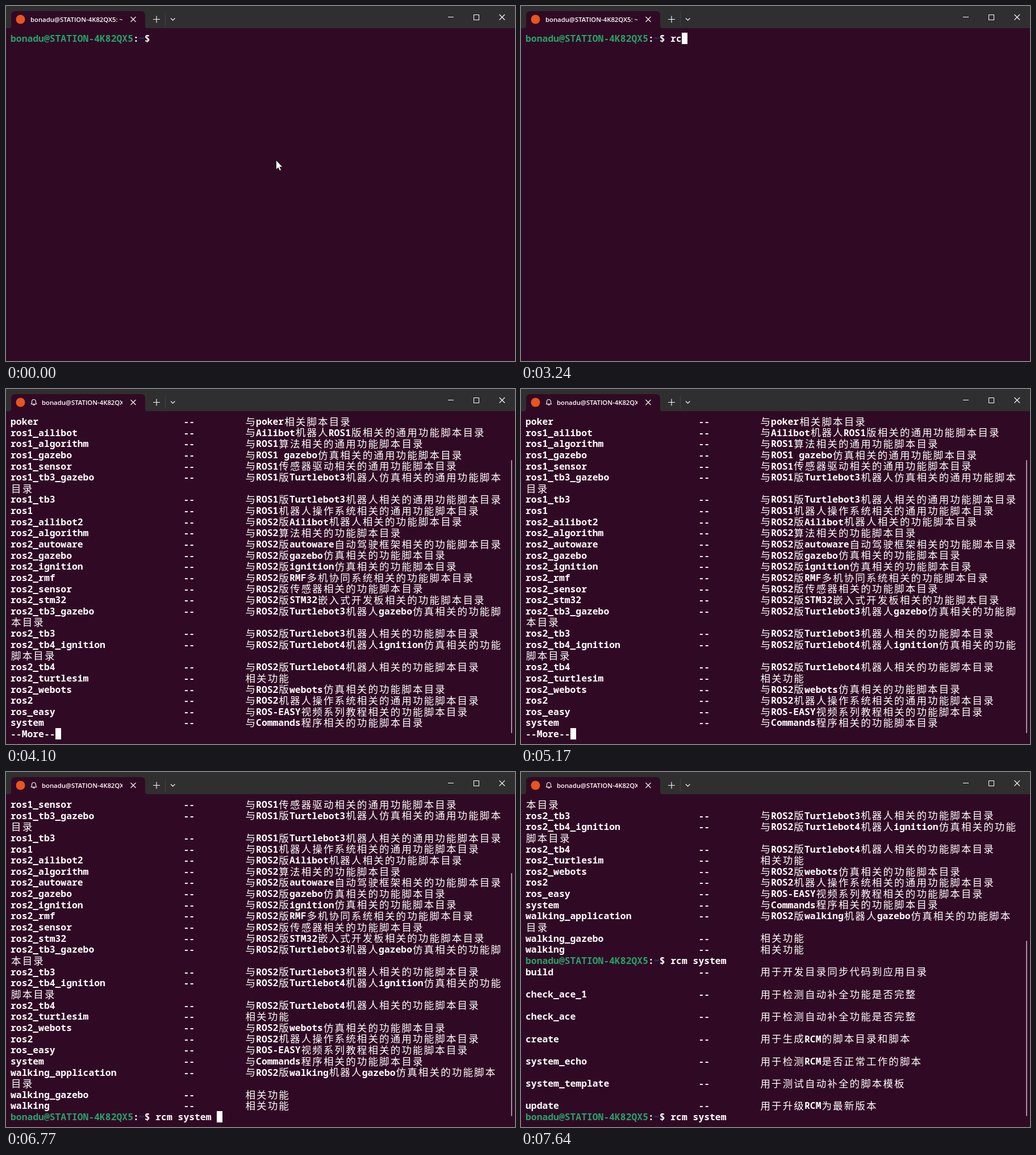
Write an HTML page that moves like this. It is 896x625 px and loops after 8 s.

```html
<!DOCTYPE html>
<html lang="zh-CN">
<head>
<meta charset="utf-8">
<title>Terminal</title>
<style>
  html, body { margin: 0; width: 100%; height: 100%; overflow: hidden; background: #300a24; }
  svg { display: block; width: 896px; height: 625px; }
  text { white-space: pre; fill: #fff; }
  .mono { font: 600 16.37px "Noto Sans Mono", monospace; font-variant-ligatures: none; }
  .cjk { font: 400 17.5px "Noto Sans CJK SC", "Noto Sans CJK", sans-serif; letter-spacing: 2.14px; }
  .title { font: 600 11.3px "Open Sans", "Noto Sans", sans-serif; }
  .icon { fill: none; stroke: #fff; stroke-width: 1.1; }
</style>
</head>
<body>
<svg viewBox="0 0 896 625">
  <defs><clipPath id="titleClip"><rect x="40" y="10" width="165" height="28"/></clipPath></defs>
  <rect width="896" height="625" fill="#300a24"/>
  <rect width="896" height="39" fill="#2f2f2f"/>
  <path d="M5 39Q9 39 9 35V17Q9 9 17 9H237Q245 9 245 17V35Q245 39 249 39Z" fill="#300a24"/>
  <circle cx="25.5" cy="23.5" r="8" fill="#e95420"/>
  <g clip-path="url(#titleClip)"><text id="title" class="title" y="28"></text></g>
  <path id="bell" class="icon" d="M44.5 26.5H53.5L52.5 24V22A3.5 3.5 0 0 0 45.5 22V24ZM47.5 27A1.5 1.5 0 0 0 50.5 27"/>
  <path class="icon" d="M219.5 19L228.5 28M228.5 19L219.5 28M290 21.5L293.7 25.2L297.4 21.5M868.5 15L878 24.5M878 15L868.5 24.5"/>
  <path class="icon" stroke-width="1.3" d="M259 23.5H271M265 17.5V29.5"/>
  <path class="icon" d="M778 19.5H788M823.5 15.5H832.5V24.5H823.5Z" shape-rendering="crispEdges"/>
  <path d="M280.5 12V35" stroke="#414141"/>
  <g id="screen"></g>
  <rect id="cursor" width="10" height="20" fill="#fff"/>
  <rect id="scrollbar" x="889" width="2" rx="1" fill="#a1949d"/>
  <path id="pointer" d="M0 0V16.5L3.8 13L6.2 18.6L8.9 17.4L6.5 11.9H11.3Z" fill="#fff" stroke="#111" stroke-width=".8"/>
</svg>
<script>
const LOOP = 8000, CELL = 9.82, ROW = 19.65, LEFT = 8, TOP = 47, COLUMNS = 88, LAST_ROW = 28;
const HOST = "bonadu@STATION-4K82QX5";
const PROMPT = HOST + ":~$ ";
const $ = id => document.getElementById(id);

const GENERAL = "相关的通用功能脚本目录", SCRIPTS = "相关的功能脚本目录";
const commands = [
  ["poker", "与poker相关脚本目录"],
  ["ros1_ailibot", "与Ailibot机器人ROS1版" + GENERAL],
  ["ros1_algorithm", "与ROS1算法" + GENERAL],
  ["ros1_gazebo", "与ROS1 gazebo仿真" + GENERAL],
  ["ros1_sensor", "与ROS1传感器驱动" + GENERAL],
  ["ros1_tb3_gazebo", "与ROS1版Turtlebot3机器人仿真" + GENERAL],
  ["ros1_tb3", "与ROS1版Turtlebot3机器人" + GENERAL],
  ["ros1", "与ROS1机器人操作系统" + GENERAL],
  ["ros2_ailibot2", "与ROS2版Ailibot机器人" + SCRIPTS],
  ["ros2_algorithm", "与ROS2算法" + SCRIPTS],
  ["ros2_autoware", "与ROS2版autoware自动驾驶框架" + SCRIPTS],
  ["ros2_gazebo", "与ROS2版gazebo仿真" + SCRIPTS],
  ["ros2_ignition", "与ROS2版ignition仿真" + SCRIPTS],
  ["ros2_rmf", "与ROS2版RMF多机协同系统" + SCRIPTS],
  ["ros2_sensor", "与ROS2版传感器" + SCRIPTS],
  ["ros2_stm32", "与ROS2版STM32嵌入式开发板" + SCRIPTS],
  ["ros2_tb3_gazebo", "与ROS2版Turtlebot3机器人gazebo仿真" + SCRIPTS],
  ["ros2_tb3", "与ROS2版Turtlebot3机器人" + SCRIPTS],
  ["ros2_tb4_ignition", "与ROS2版Turtlebot4机器人ignition仿真" + SCRIPTS],
  ["ros2_tb4", "与ROS2版Turtlebot4机器人" + SCRIPTS],
  ["ros2_turtlesim", "相关功能"],
  ["ros2_webots", "与ROS2版webots仿真" + SCRIPTS],
  ["ros2", "与ROS2机器人操作系统" + GENERAL],
  ["ros_easy", "与ROS-EASY视频系列教程" + SCRIPTS],
  ["system", "与Commands程序" + SCRIPTS],
  ["walking_application", "与ROS2版walking机器人gazebo仿真" + SCRIPTS],
  ["walking_gazebo", "相关功能"],
  ["walking", "相关功能"]
];
const systemCommands = [
  ["build", "用于开发目录同步代码到应用目录"],
  ["check_ace_1", "用于检测自动补全功能是否完整"],
  ["check_ace", "用于检测自动补全功能是否完整"],
  ["create", "用于生成RCM的脚本目录和脚本"],
  ["system_echo", "用于检测RCM是否正常工作的脚本"],
  ["system_template", "用于测试自动补全的脚本模板"],
  ["update", "用于升级RCM为最新版本"]
];

const cells = s => [...s].reduce((n, c) => n + (c > "~" ? 2 : 1), 0);
const entry = ([name, info]) => name.padEnd(31) + "--".padEnd(11) + info;

function wrap(line) {
  const rows = [""];
  for (const c of line) {
    if (cells(rows[rows.length - 1] + c) > COLUMNS) rows.push("");
    rows[rows.length - 1] += c;
  }
  return rows;
}

const listing = commands.map(entry).flatMap(wrap);
const subListing = systemCommands.flatMap((c, i) => i ? ["", entry(c)] : [entry(c)]);
const history = [...listing, PROMPT + "rcm system", ...subListing];

// Latest value whose start time has passed.
const at = (steps, t) => steps.filter(([start]) => t >= start).pop()[1];

const typed = [[0, ""], [2500, "r"], [3240, "rc"], [3300, "rcm"], [3570, "rcm "],
  [6100, "rcm s"], [6170, "rcm sy"], [6440, "rcm system "]];
const blink = [[0, 0], [770, 1], [1300, 0], [1840, 1], [2370, 0], [2500, 1],
  [4640, 0], [5170, 1], [7640, 0]];
const bell = [[0, 0], [3840, 1], [5900, 0], [6770, 1]];
const views = [
  [0, { first: 0, count: 0 }],
  [4100, { first: 0, count: 28, more: true, thumb: 125 }],
  [5370, { first: 4, count: 28, thumb: 178 }],
  [7040, { first: 18, count: 28, thumb: 297 }]
];
const pointerStep = [[0, 0], [500, .25], [590, .6], [680, .9], [770, 1]];

function run(text, column, row, color) {
  const wide = text > "~";
  const x = LEFT + column * CELL + (wide ? 1 : 0);
  const y = TOP + row * ROW + (wide ? 16.6 : 15.9);
  return `<text class="${wide ? "cjk" : "mono"}" x="${x}" y="${y}" style="fill:${color}">${text}</text>`;
}

function drawRow(line, row) {
  let column = 0, out = "";
  const add = (text, color = "#fff") => {
    if (text.trim()) out += run(text, column, row, color);
    column += cells(text);
  };
  if (line.startsWith(PROMPT)) {
    add(HOST, "#26a269");
    add(":");
    add("~", "#12488b");
    line = line.slice(column);
  }
  // Padding is skipped so that every column starts on its own cell.
  for (const part of line.match(/ {2,}|(?:[!-~]| (?! ))+|[^ -~]+/g) || []) add(part);
  return out;
}

let shown = "";
function render(t) {
  const view = at(views, t);
  const input = view.more ? "--More--" : PROMPT + at(typed, t);
  const inputRow = view.count ? LAST_ROW : 0;
  const key = view.first + input + inputRow;
  if (key !== shown) {
    const rows = history.slice(view.first, view.first + view.count);
    $("screen").innerHTML = rows.map(drawRow).join("") + drawRow(input, inputRow);
    shown = key;
  }
  const cursor = $("cursor");
  cursor.setAttribute("x", Math.round(LEFT + cells(input) * CELL));
  cursor.setAttribute("y", Math.round(TOP + inputRow * ROW));
  cursor.style.opacity = at(blink, t);

  const scrollbar = $("scrollbar");
  scrollbar.style.opacity = view.count ? 1 : 0;
  scrollbar.setAttribute("y", view.thumb || 0);
  scrollbar.setAttribute("height", 606 - (view.thumb || 0));

  const ringing = at(bell, t);
  $("bell").style.opacity = ringing;
  $("title").setAttribute("x", ringing ? 63 : 43);

  const p = at(pointerStep, t);
  $("pointer").setAttribute("transform", `translate(${475.5 - 33 * p} ${271.5 - 4 * p})`);
  $("pointer").style.opacity = t < 2500 ? 1 : 0;
}

$("title").textContent = HOST + ": ~";
const start = performance.now();
function frame() {
  render((performance.now() - start) % LOOP);
  requestAnimationFrame(frame);
}
frame();
</script>
</body>
</html>
```
